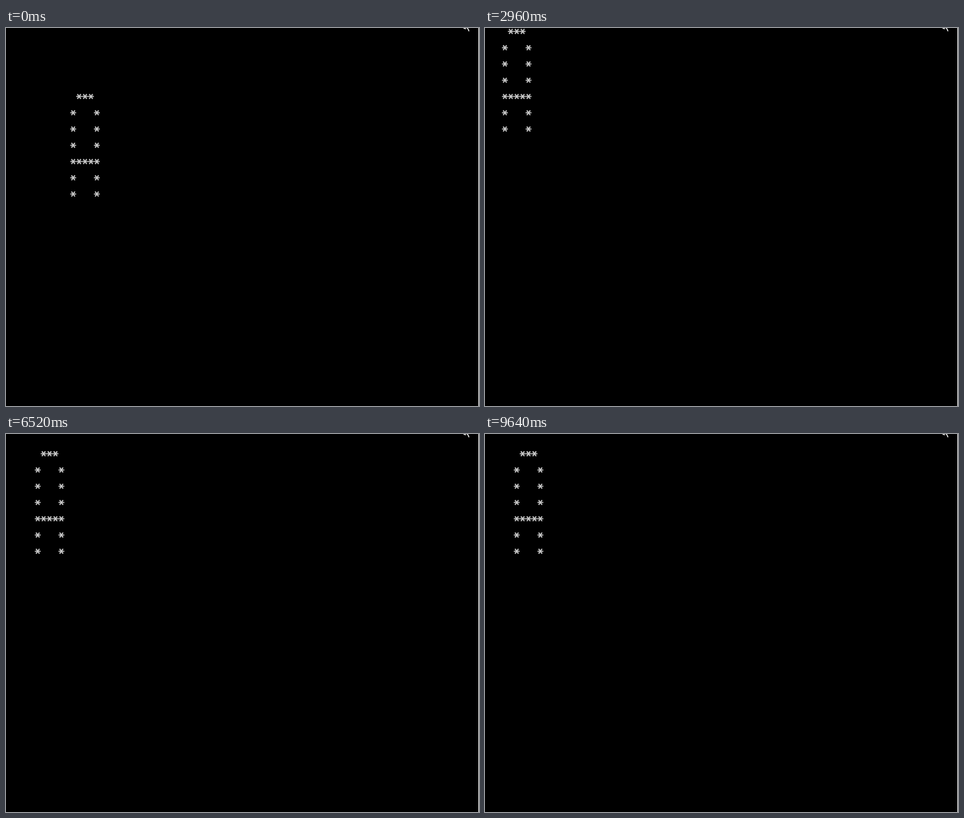
An HTML page with a canvas that plays this animation: 720 px wide and 576 px high, repeating every 9680 ms.

```html
<!DOCTYPE html>
<html lang="en">
<head>
<meta charset="utf-8">
<title>Bouncing console letter</title>
<style>
  html, body { margin: 0; width: 100%; height: 100%; overflow: hidden; background: #000; }
  canvas { display: block; }
</style>
</head>
<body>
<canvas id="stage" width="720" height="576"></canvas>
<script>
const ctx = document.getElementById('stage').getContext('2d');
const LOOP = 9680, TICK = 40;
const CELL_W = 9, CELL_H = 24.77, LAST_STEP = 15;
const LETTER = [' ***', '*   *', '*   *', '*   *', '*****', '*   *', '*   *'];

// Times in ms at which the letter reaches the top left, bottom right, top left, ...
const TURNS = [-555, 1225, 2950, 4710, 6390, 8125, 9740];

function stepAt(t) {
  const next = TURNS.findIndex(time => time > t);
  const start = TURNS[next - 1];
  const moved = Math.floor(LAST_STEP * (t - start) / (TURNS[next] - start));
  return next % 2 ? moved : LAST_STEP - moved;
}

function line(width, ...points) {
  ctx.lineWidth = width;
  ctx.beginPath();
  for (let i = 0; i < points.length; i += 2) ctx.lineTo(points[i], points[i + 1]);
  ctx.stroke();
}

function star(x, y) {
  line(1.5, x - 4.5, y, x + 4.5, y);
  line(1.8, x - 2.6, y - 3.7, x + 2.6, y + 3.7);
  line(1.8, x + 2.6, y - 3.7, x - 2.6, y + 3.7);
}

function draw(t) {
  ctx.fillStyle = '#000';
  ctx.fillRect(0, 0, 720, 576);
  ctx.fillStyle = '#eee';
  ctx.fillRect(719, 0, 1, 576);

  // Lower tip of the mouse pointer
  ctx.strokeStyle = '#eee';
  line(1.5, 696.5, 0, 700, 1.2);
  line(1.5, 701.5, 0, 703.2, 1.2, 704.8, 5);

  ctx.strokeStyle = '#c8c8c8';
  const n = stepAt(t);
  LETTER.forEach((row, r) => {
    [...row].forEach((ch, c) => {
      if (ch === '*') star(30.3 + (2 * n + c) * CELL_W, 5.3 + (n + r) * CELL_H);
    });
  });
}

function frame() {
  draw(Math.floor((performance.now() % LOOP) / TICK) * TICK);
  requestAnimationFrame(frame);
}
frame();
</script>
</body>
</html>
```
